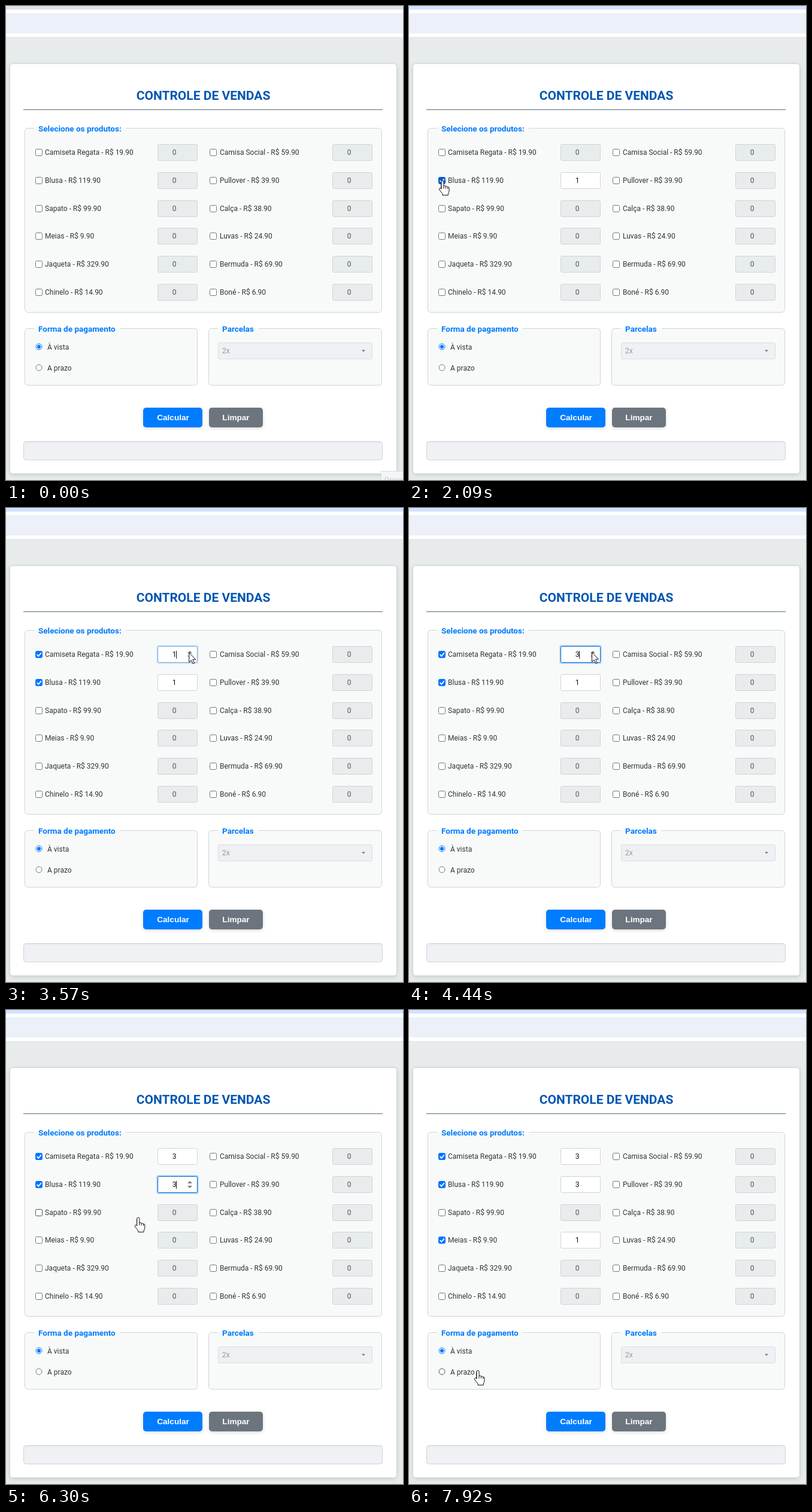
An HTML page for the animation above (7990 ms loop, 663x793 px).

```html
<!DOCTYPE html>
<html lang="pt-BR">
<head>
<meta charset="utf-8">
<title>Controle de vendas</title>
<style>
  html, body { margin: 0; width: 100%; height: 100%; overflow: hidden; background: #e7ebec; }
  svg { display: block; font: 12px Roboto, sans-serif; }
  .line { stroke: #ced4da; }
  .legend { font-weight: 600; font-size: 13.5px; fill: #007bff; }
  .btn { font: bold 13.6px "Liberation Sans", sans-serif; fill: #fff; text-anchor: middle; }
</style>
</head>
<body>
<svg id="stage" width="663" height="793" viewBox="0 0 663 793">
  <defs>
    <filter id="soft" x="-10%" y="-10%" width="120%" height="125%">
      <feDropShadow dx="0" dy="2" stdDeviation="3" flood-opacity=".13"/>
    </filter>
    <linearGradient id="inset" x2="0" y2="1">
      <stop offset="0" stop-color="#e6e8ec"/>
      <stop offset=".12" stop-color="#f0f1f5"/>
    </linearGradient>
  </defs>
  <rect width="663" height="793" fill="#e7ebec"/>
  <rect width="663" height="53" fill="#fff"/>
  <rect id="bar" width="663" height="6"/>
  <rect y="12" width="663" height="34" fill="#ecf0f9"/>
  <rect y="52" width="663" height="1" fill="#dfe2e4"/>
  <rect x="6.5" y="96.5" width="646" height="686" rx="5" fill="#fff" class="line" filter="url(#soft)"/>
  <text x="329.5" y="157" text-anchor="middle" font-size="21" font-weight="700" fill="#0056b3">CONTROLE DE VENDAS</text>
  <rect x="29" y="173" width="600" height="1" fill="#566d7e"/>
  <g id="form"></g>
  <rect x="229" y="672" width="99" height="33" rx="5" fill="#007bff" filter="url(#soft)"/>
  <text class="btn" x="279" y="693">Calcular</text>
  <rect x="339" y="672" width="90" height="33" rx="5" fill="#6c757d" filter="url(#soft)"/>
  <text class="btn" x="384" y="693">Limpar</text>
  <rect x="29.5" y="728.5" width="599" height="31" rx="4" fill="url(#inset)" class="line"/>
  <g id="tip">
    <rect x="626.5" y="778.5" width="60" height="30" fill="#f3f5f6" stroke="#d8dcde"/>
    <text x="632" y="797" fill="#c6cacd">Gravação</text>
  </g>
  <g id="cursor" fill="#fff" stroke="#111" stroke-linejoin="round">
    <path id="arrow" d="M.5.5V16.5L4.2 13L6.8 19L9.3 18L6.7 12H11.6Z"/>
    <path id="hand" d="M-2.2 1.5Q-2.2-.8 0-.8T2 1.5V8Q4.6 6.8 5.4 9Q7.8 7.8 8.7 10Q11 9.4 11 12V16Q11 19 9.3 21V23.5H0V21L-5 15Q-6.5 12.4-4.6 11.5Q-3.4 11.3-2.2 13.2Z M-2.2 1.5V13M2 8V12.5M5.4 9V12.5M8.7 10V13"/>
  </g>
</svg>
<script>
const LOOP = 7990;
const $ = id => document.getElementById(id);
const form = $('form');

function el(tag, attrs, text, parent = form) {
  const e = document.createElementNS('http://www.w3.org/2000/svg', tag);
  set(e, attrs);
  if (text != null) e.textContent = text;
  parent.appendChild(e);
  return e;
}
function set(e, attrs) {
  for (const k in attrs) e.setAttribute(k, attrs[k]);
}
const show = (e, on) => set(e, { visibility: on ? 'visible' : 'hidden' });
const clamp = v => Math.max(0, Math.min(1, v));
const ramp = (t, from, ms = 150) => clamp((t - from) / ms);
const mix = (a, b, k) => `rgb(${a.map((v, i) => Math.round(v + (b[i] - v) * k))})`;

function fieldset(x, y, w, h, title, gap) {
  el('rect', { x: x + .5, y: y + .5, width: w, height: h, rx: 5, fill: '#f8faf9', class: 'line' });
  el('rect', { x: x + 16, y: y - 1, width: gap, height: 3, fill: '#f8faf9' });
  el('rect', { x: x + 16, y: y - 1, width: gap, height: 1, fill: '#fff' });
  el('text', { x: x + 23, y: y + 5.5, class: 'legend' }, title);
}

// Product rows; `on` is when a row is ticked, `focus` the span its input holds focus.
const items = [
  ['Camiseta Regata', '19.90', { on: 2790, focus: [3500, 5060], steps: [3720, 4240] }],
  ['Blusa', '119.90', { on: 1890, focus: [5060, 7120], steps: [5340, 5640] }],
  ['Sapato', '99.90'], ['Meias', '9.90', { on: 7120 }],
  ['Jaqueta', '329.90'], ['Chinelo', '14.90'],
  ['Camisa Social', '59.90'], ['Pullover', '39.90'], ['Calça', '38.90'],
  ['Luvas', '24.90'], ['Bermuda', '69.90'], ['Boné', '6.90']
];

fieldset(31, 204, 596, 308, 'Selecione os produtos:', 153);
fieldset(31, 539, 288, 95, 'Forma de pagamento', 143);
fieldset(338, 539, 289, 95, 'Parcelas', 68);

const rows = items.map(([name, price, plan = {}], i) => {
  const right = i > 5, y = Math.round(245 + 46.8 * (i % 6));
  const x = right ? 340 : 49, ix = right ? 545 : 253;
  const r = { x, y, on: Infinity, focus: [Infinity, Infinity], steps: [], ...plan };
  r.box = el('rect', { x: x + .5, y: y - 5.5, width: 11, height: 11, rx: 2 });
  r.tick = el('path', { d: `M${x + 2.7} ${y + .2}l2.6 2.7l4.6-5.6`, fill: 'none', stroke: '#fff', 'stroke-width': 1.8 });
  el('text', { x: x + (right ? 17 : 16), y: y + 4, fill: '#333' }, `${name} - R$ ${price}`);
  r.glow = el('rect', { x: ix - 2, y: y - 16, width: 71, height: 32, rx: 4, fill: '#007bff' });
  r.input = el('rect', { x: ix + .5, y: y - 13.5, width: 66, height: 27, rx: 2 });
  r.value = el('text', { x: ix + 28, y: y + 4, 'text-anchor': 'middle' }, '0');
  r.caret = el('rect', { x: ix + 31, y: y - 6, width: 1, height: 13, fill: '#111' });
  r.spin = el('path', { d: `M${ix + 50} ${y - 2}l4-4l4 4zM${ix + 50} ${y + 2}l4 4l4-4z`, fill: '#7b7b7b' });
  return r;
});

const radios = [['À vista', 570], ['A prazo', 605]].map(([text, y], i) => {
  const ring = el('circle', { cx: 55, cy: y, r: 5, fill: '#fff', stroke: i ? '#767676' : '#0075ff' });
  if (!i) el('circle', { cx: 55, cy: y, r: 3.1, fill: '#0075ff' });
  el('text', { x: 69, y: y + 5, fill: '#333' }, text);
  return { ring, y, i };
});
el('rect', { x: 354.5, y: 563.5, width: 257, height: 27, rx: 2, fill: '#eef0f3', stroke: '#d9dde2' });
el('text', { x: 361, y: 581, fill: '#979a9e' }, '2x');
el('path', { d: 'M594 575.5h6l-3 3z', fill: '#6f7275' });

// Pointer path: time, x, y
const path = [
  [70, 649, 773], [380, 494, 636], [560, 494, 636], [790, 333, 495], [960, 333, 495],
  [1250, 165, 378], [1480, 90, 307], [1760, 56, 293], [2150, 56, 293], [2580, 58, 256],
  [2720, 58, 246], [2930, 58, 246], [3430, 300, 246], [3600, 306, 241], [4440, 305, 241],
  [4620, 310, 243], [4990, 308, 278], [5200, 306, 286], [5930, 306, 286], [6300, 221, 348],
  [6730, 75, 371], [6920, 56, 384], [7130, 57, 385], [7290, 95, 433], [7570, 139, 600],
  [7650, 145, 611], [7920, 115, 604]
];
function pointer(t) {
  const n = path.findIndex(p => p[0] > t);
  if (n < 0) return path[path.length - 1].slice(1);
  if (n === 0) return path[0].slice(1);
  const [t0, x0, y0] = path[n - 1], [t1, x1, y1] = path[n];
  const k = (t - t0) / (t1 - t0), e = .5 * k + .5 * k * k * (3 - 2 * k);
  return [x0 + (x1 - x0) * e, y0 + (y1 - y0) * e];
}

function drawRow(r, t, hover) {
  const on = t >= r.on, [f0, f1] = r.focus;
  const focus = ramp(t, f0) - ramp(t, f1), focused = t >= f0 && t < f1;
  const fresh = on && t < r.on + 130;
  const color = fresh ? '#555' : hover ? '#005cc8' : '#0075ff';
  set(r.box, { fill: on ? color : '#fff', stroke: on ? color : hover ? '#4f4f4f' : '#767676' });
  show(r.tick, on);
  set(r.input, {
    fill: mix([232, 236, 237], [255, 255, 255], ramp(t, r.on, 180)),
    stroke: mix([206, 212, 218], [0, 98, 204], focus)
  });
  set(r.glow, { opacity: .27 * focus });
  r.value.textContent = on ? 1 + r.steps.filter(s => t >= s).length : 0;
  set(r.value, { fill: on ? '#111' : '#545454' });
  const last = Math.max(f0, ...r.steps.filter(s => t >= s));
  show(r.caret, focused && (t - last) % 1000 < 500 || focused && t > 6200 && t < 6500);
  show(r.spin, focused);
}

function draw(t) {
  const [x, y] = pointer(t);
  const over = (r, w, h) => t >= 70 && x >= r.x && x < r.x + w && Math.abs(y - r.y) < h;
  let link = false;
  for (const r of rows) {
    const hover = over(r, 200, 14);
    link = link || hover;
    drawRow(r, t, hover);
  }
  for (const r of radios) {
    const hover = over({ x: 49, y: r.y }, 255, 12);
    link = link || hover;
    set(r.ring, { stroke: r.i ? (hover ? '#4f4f4f' : '#767676') : hover ? '#005cc8' : '#0075ff' });
  }
  set($('bar'), { fill: t < 1890 ? '#dee1e6' : '#d3e3fd' });
  show($('tip'), t < 70);
  set($('cursor'), { transform: `translate(${x.toFixed(1)} ${y.toFixed(1)})` });
  show($('arrow'), t >= 70 && !link);
  show($('hand'), t >= 70 && link);
}

const start = performance.now();
function tick(now) {
  draw(Math.max(0, now - start) % LOOP);
  requestAnimationFrame(tick);
}
draw(0);
requestAnimationFrame(tick);
</script>
</body>
</html>
```
